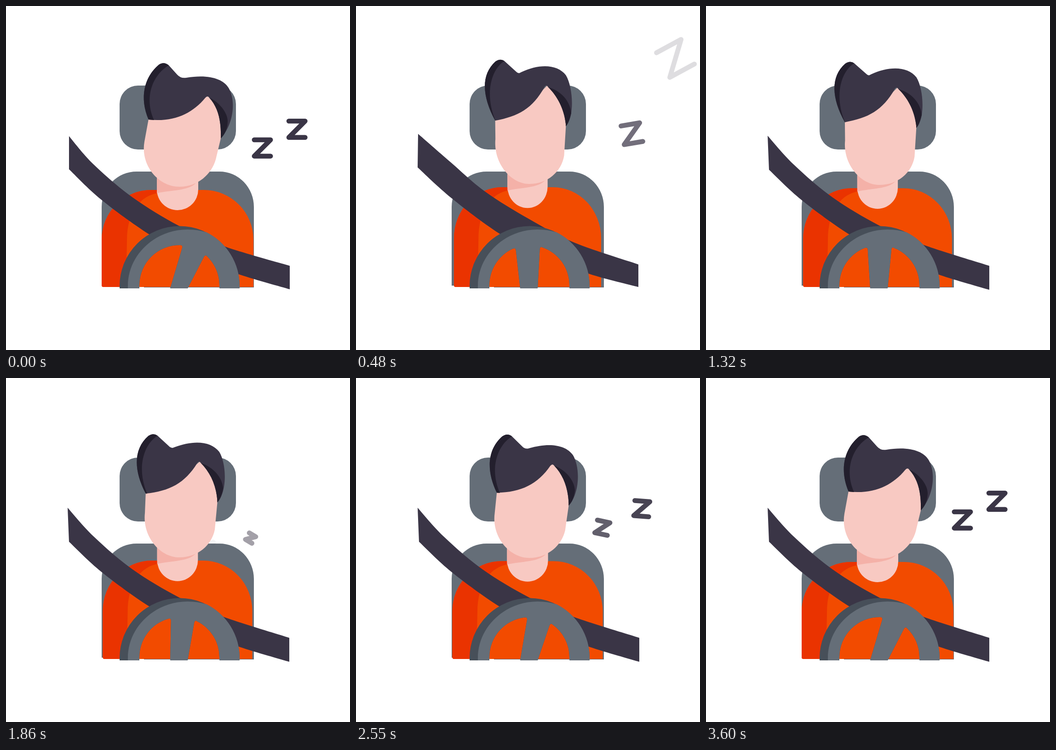
An HTML page that plays this animation: 748 px wide and 748 px high, repeating every 5630 ms.

```html
<!DOCTYPE html>
<html lang="en">
<head>
<meta charset="utf-8">
<title>Sleepy driver</title>
<style>
  html, body { margin: 0; width: 100%; height: 100%; overflow: hidden; background: #fff; }
  svg { display: block; width: 100%; height: 100%; }
  .grey { fill: #656e78; }
  .dark { fill: #3a3546; }
  .shade { fill: #231f2d; }
  .orange { fill: #f24b00; }
  .skin { fill: #f8c9c2; }
  .z { fill: none; stroke: #3a3546; stroke-width: 10.5; stroke-linecap: round; stroke-linejoin: round; }
</style>
</head>
<body>
<svg viewBox="0 0 748 748">
  <rect class="grey" x="247" y="173" width="253" height="139" rx="40"/>
  <path class="grey" d="M208 608V437A76 77 0 0 1 284 360H464A75 77 0 0 1 539 437V612H300V608z"/>
  <path id="z0" class="z"/>
  <path id="z1" class="z"/>
  <g id="person">
    <path class="orange" d="M208 607V508A108 108 0 0 1 316 400H430A108 108 0 0 1 538 508V611H212Q208 611 208 607z"/>
    <path fill="#ea3300" d="M208 607V508A108 108 0 0 1 316 400H330V407C295 412 263 445 263 510L261 611H212Q208 611 208 607z"/>
    <path class="skin" d="M328 355H418V399A45 45 0 0 1 328 399z"/>
    <path fill="#f4b1a8" d="M328 365H412V386C395 402 360 400 328 407z"/>
    <path id="face" class="skin"/>
    <path id="hair" class="dark"/>
    <path id="tuft" class="shade"/>
    <path id="lock" class="shade"/>
  </g>
  <path id="belt" class="dark"/>
  <path class="orange" d="M288 611V607A89 89 0 0 1 466 607V611z"/>
  <path id="rim" fill="#474f59" fill-rule="evenodd"/>
  <path id="wheel" class="grey" fill-rule="evenodd"/>
</svg>
<script>
const LOOP = 5630, END = 3600, STEP = 30;
const el = id => document.getElementById(id);
const lerp = (a, b, k) => a + (b - a) * k;
const clamp = k => Math.max(0, Math.min(1, k));
const smooth = k => k * k * (3 - 2 * k);
const draw = (id, d) => el(id).setAttribute('d', d);

// Blend two path strings that share the same commands.
function blend(a, b, k) {
  const nums = b.match(/-?[\d.]+/g);
  let i = 0;
  return a.replace(/-?[\d.]+/g, n => lerp(+n, +nums[i++], k).toFixed(2));
}

// The jolt is eased, the slow drift afterwards is linear.
function segment(t, keys) {
  let i = 0;
  while (i < keys.length - 2 && t >= keys[i + 1][0]) i++;
  const [t0, a] = keys[i], [t1, b] = keys[i + 1];
  const k = clamp((t - t0) / (t1 - t0));
  return [a, b, t1 < 1300 ? smooth(k) : k];
}
const track = (t, keys) => lerp(...segment(t, keys));

// Each shape: head tilted, head upright.
const head = {
  face: [
    'M310 246L301 295C292 345 330 393 377 393C418 393 447 365 456 334L467 288V230L438 195L370 230z',
    'M300.5 258L301 298C296 348 335 393 377 393C418 393 449 367 455 333L459 270V230L417 185L370 230z'],
  hair: [
    'M310 247C290 200 300 155 332 128Q343 120 354 129L372 149Q380 158 392 156C440 148 472 158 484 178C500 205 496 255 467 288C468 250 462 222 442 199Q438 194 433 200C405 234 365 253 310 247z',
    'M300.5 259C271 208 268 162 301 134Q312 127 321 133L348 156Q353 161 358 157C400 138 440 140 459 163C475 188 479 250 459 271C457 238 441 208 419 188Q415 182 411 188C384 234 352 250 300.5 259z'],
  tuft: [
    'M310 247C290 200 300 155 332 128Q343 120 354 129C318 150 300 200 322 248z',
    'M300.5 259C271 208 268 162 301 134Q312 127 321 133C290 152 277 205 301 259z'],
  lock: [
    'M467 288C468 250 462 222 442 199C468 212 482 235 482 250C482 265 477 278 467 288z',
    'M459 271C457 238 441 208 419 188C448 196 468 217 471 243C468 254 465 264 459 271z']
};

// Smooth curve through points, continuing a path.
function curve(p) {
  let d = '';
  for (let i = 0; i < p.length - 1; i++) {
    const a = p[i - 1] || p[i], b = p[i], c = p[i + 1], e = p[i + 2] || c;
    const ctl = (q, from, to, s) => q.map((v, n) => v + s * (to[n] - from[n]) / 6);
    d += `C${[ctl(b, a, c, 1), ctl(c, b, e, -1), c].join(' ')}`;
  }
  return d;
}
function strap(top, low) {
  low.reverse();
  return (`M${top[0]}${curve(top)}L${low[0]}${curve(low)}z`).replace(/,/g, ' ');
}
const belt = dy => strap(
  [[137, 283], [190, 344], [275, 416], [376, 478], [476, 523], [617, 565]].map(([x, y]) => [x, y + dy]),
  [[137, 355], [207, 421], [312, 497], [400, 543], [505, 583], [617, 616]].map(([x, y]) => [x, y + dy]));
const beltRest = strap(
  [[134, 282], [190, 344], [275, 416], [376, 477], [472, 519], [616, 565]],
  [[137, 356], [208, 422], [312, 497], [400, 543], [506, 584], [616, 617]]);
const beltKeys = [
  [0, belt(0)],
  [240, belt(4)],
  [480, strap(
    [[135, 278], [205, 339], [280, 403], [376, 463], [476, 515], [614, 562]],
    [[134, 351], [208, 418], [312, 495], [400, 540], [506, 582], [614, 611]])],
  [720, strap(
    [[136, 268], [222, 335], [300, 398], [385, 450], [487, 500], [616, 553]],
    [[132, 339], [205, 402], [325, 477], [400, 505], [500, 561], [615, 600]])],
  [1250, beltRest],
  [END, beltRest]
];

const liftKeys = [[0, 0], [480, 1], [570, 0.95], [720, 0.2], [780, 0.1], [1100, 0.7], [END, 0]];
const headKeys = [[0, 0], [450, 1], [1305, 1], [END, 0]];
const turnKeys = [[0, 0], [480, 1], [720, 0.57], [1100, 0.95], [1320, 0.886], [1860, 0.686], [2550, 0.314], [END, 0]];

// Openings on either side of the wheel's spoke.
function openings(turn) {
  const y = x => 607 - Math.sqrt(87 * 87 - (x - 377) ** 2);
  const l = lerp(385, 347, turn), r = lerp(433, 400, turn);
  return `M290 614V607A87 87 0 0 1 ${l - 6} ${y(l - 6)}Q${l} ${y(l)} ${lerp(l, 357, 0.07)} ${y(l) + 6}L357 614z`
    + `M464 614V607A87 87 0 0 0 ${r + 5} ${y(r + 5)}Q${r + 1} ${y(r) - 1} ${lerp(r, 395, 0.07)} ${y(r) + 5}L395 614z`;
}

// Quadratic drifts: [linear, square] for x and y, before and after the rest point.
const sleep = [
  { x: 632.7, y: 268, inX: [143, 85], inY: [223, -137], outX: [110, -43], outY: [-140, -53], grow: 0.86, leave: 0, enter: 1526 },
  { x: 557.5, y: 308.7, inX: [102, 12], inY: [89, -39], outX: [167, -62], outY: [-94, -53], grow: 0.56, leave: 200, enter: 1828 }
];
function drawZ(z, i, t) {
  const quad = ([a, b], k) => a * k + b * k * k;
  let { x, y } = z, size = 1, turn = 0, alpha = 1;
  if (t < 1200) {
    const p = clamp((t - z.leave) / 525) ** 2;
    x += quad(z.outX, p);
    y += quad(z.outY, p);
    size += z.grow * p;
    turn = -34 * p;
    alpha = 1 - p;
  } else {
    const r = (1 - clamp((t - z.enter) / 1775)) ** 3;
    x -= quad(z.inX, r);
    y += quad(z.inY, r);
    size = 1 - r;
    turn = 57 * r;
    alpha = 1 - r;
  }
  const h = 17.7 * size, node = el('z' + i);
  draw('z' + i, `M${-h} ${-h}H${h}L${-h} ${h}H${h}`);
  node.setAttribute('transform', `translate(${x} ${y}) rotate(${turn})`);
  node.setAttribute('opacity', alpha);
}

function render(t) {
  const lift = track(t, liftKeys), upright = track(t, headKeys);
  el('person').setAttribute('transform',
    `translate(373 611) scale(${1 - 0.03 * lift} ${1 + 0.028 * lift}) translate(-373 -611)`);
  for (const id in head) draw(id, blend(...head[id], upright));
  draw('belt', blend(...segment(t, beltKeys)));
  const holes = openings(track(t, turnKeys));
  draw('rim', 'M247 614V609A130.5 130.5 0 0 1 508 609V614z' + holes);
  draw('wheel', 'M265 614V609C265 540 325 486 395 486Q417 486 436 492A130.5 130.5 0 0 1 508 609V614z' + holes);
  sleep.forEach((z, i) => drawZ(z, i, t));
}

const start = performance.now();
function tick() {
  const t = (performance.now() - start) % LOOP;
  render(Math.min(END, Math.floor(t / STEP) * STEP));
  requestAnimationFrame(tick);
}
tick();
</script>
</body>
</html>
```
